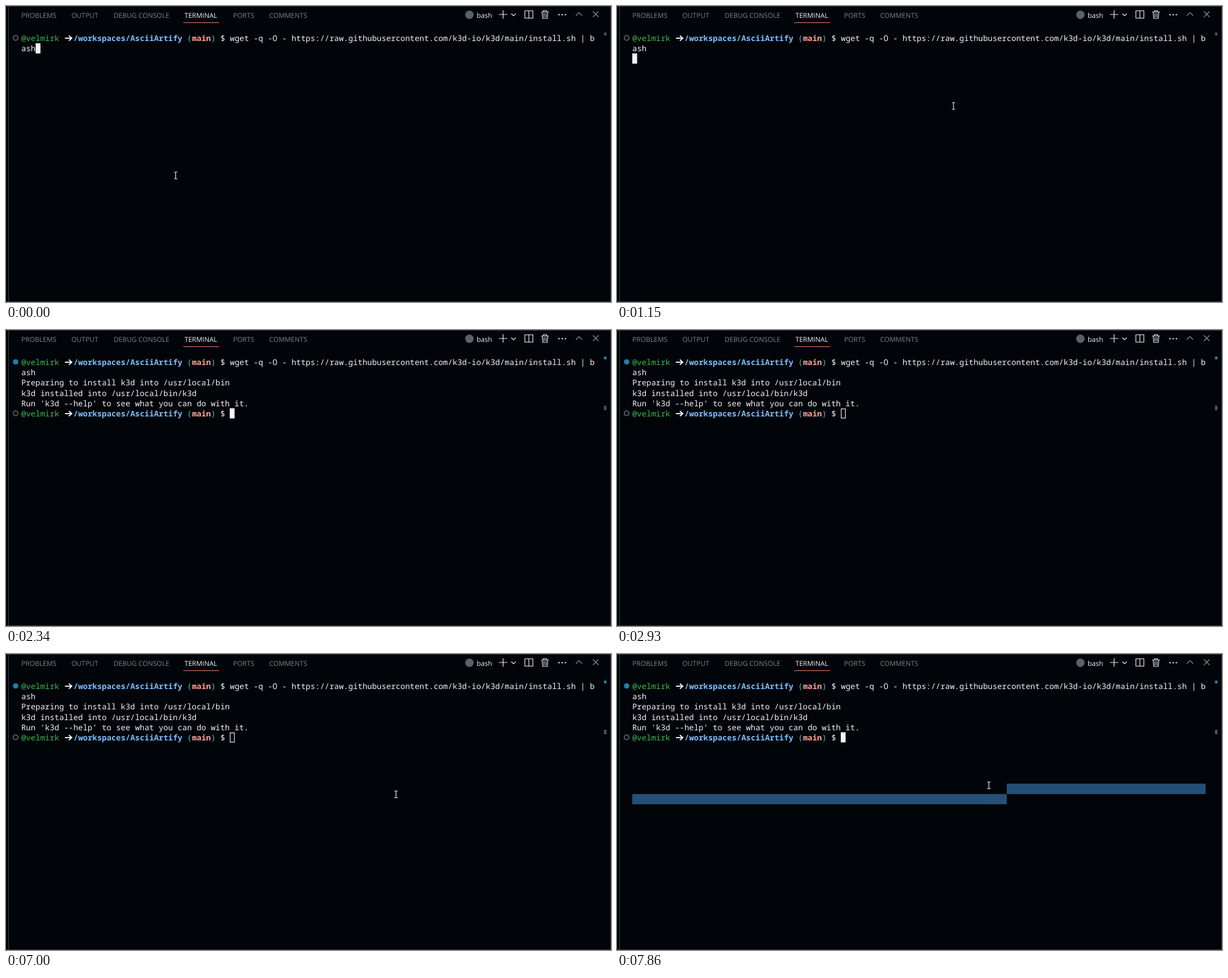
Animation, 1068 px wide and 524 px high, one loop 8 s. Source, as an HTML page:

```html
<!DOCTYPE html>
<html lang="en">
<head>
<meta charset="utf-8">
<title>Terminal</title>
<style>
  html, body { margin: 0; width: 100%; height: 100%; overflow: hidden; background: #010409; }
  svg { display: block; width: 1068px; height: 524px; }
  text { white-space: pre; text-rendering: geometricPrecision; }
  .ui { font: 12px "Open Sans", sans-serif; fill: #7d8590; }
  .ui .on { fill: #f0f6fc; }
  .term { font: 13.95px "Noto Sans Mono", monospace; fill: #f0f6fc; }
  .user { fill: #3fb950; }
  .path { fill: #79c0ff; font-weight: bold; }
  .paren { fill: #39c5cf; }
  .branch { fill: #ffa198; font-weight: bold; }
  .line { fill: none; stroke: #f0f6fc; stroke-width: 1.2; }
  .dim { stroke: #8b949e; }
  .ring { fill: none; stroke: #6e7681; stroke-width: 1.5; }
  .mark { fill: #484f58; }
  .done { fill: #1b81a8; }
  .block { fill: #f0f6fc; }
</style>
</head>
<body>
<svg viewBox="0 0 1068 524">
  <defs>
    <g id="prompt">
      <text class="user" x="27" y="62">@velmirk</text>
      <path d="M104 57H115M111 52.5L116 57L111 61.5" fill="none" stroke="#f0f6fc" stroke-width="2.1"/>
      <text x="119.1" y="62"><tspan class="path">/workspaces/AsciiArtify</tspan> <tspan class="paren">(</tspan><tspan class="branch">main</tspan><tspan class="paren">)</tspan> $ </text>
    </g>
  </defs>

  <path d="M0 .5H1068M4.5 0V524M1067.5 0V524M0 523.5H1068" stroke="#3d444d" fill="none"/>

  <g class="ui">
    <text x="27" y="20.5">PROBLEMS</text>
    <text x="115.5" y="20.5">OUTPUT</text>
    <text x="190" y="20.5">DEBUG CONSOLE</text>
    <text x="315" y="20.5" class="on">TERMINAL</text>
    <text x="401" y="20.5">PORTS</text>
    <text x="464.5" y="20.5">COMMENTS</text>
    <path d="M313 29.5H376" stroke="#f78166" stroke-width="1.2"/>
    <circle id="shellIcon" cx="818" cy="15.5" r="7.5" fill="#59616b"/>
    <text id="shellName" x="858" y="20.5" class="on" text-anchor="end">bash</text>
  </g>

  <g class="line">
    <path d="M870 15H885M877.5 7.5V22.5"/>
    <path d="M892 13.5L896 17.5L900 13.5"/>
    <path d="M916 8.5H930V21.5H916ZM923 8.5V21.5"/>
    <path d="M945 10.5H958M949 10V8H954V10M946.5 11L947.5 22H955.5L956.5 11M949.8 12.5V20M953.2 12.5V20"/>
    <path d="M975 15.3H977.2M980.7 15.3H982.9M986.4 15.3H988.6" stroke-width="2.2"/>
    <path class="dim" d="M1006 17L1011.5 11.5L1017 17M1036 9.5L1046 19.5M1046 9.5L1036 19.5"/>
  </g>

  <g class="term">
    <g data-from="7150" fill="#264f78">
      <path d="M688 229.5H1039V248H688V266H27V248H688Z"/>
    </g>
    <use href="#prompt"/>
    <text x="395.3" y="62">wget -q -O - https://raw.githubusercontent.com/k3d-io/k3d/main/install.sh | b</text>
    <text x="27" y="80.2">ash</text>
    <text x="27" y="98.4" data-from="1940">Preparing to install k3d into /usr/local/bin</text>
    <g data-from="2340">
      <text x="27" y="116.6">k3d installed into /usr/local/bin/k3d</text>
      <text x="27" y="134.8">Run 'k3d --help' to see what you can do with it.</text>
      <use href="#prompt" y="91"/>
    </g>
  </g>

  <g data-to="2340">
    <circle class="ring" cx="17" cy="56.5" r="4.2"/>
    <rect class="mark" x="1055.5" y="47" width="4.5" height="5"/>
  </g>
  <g data-from="2340">
    <circle class="done" cx="17" cy="56.5" r="4.8"/>
    <rect class="done" x="1055.5" y="47" width="4.5" height="5"/>
    <circle class="ring" cx="17" cy="147.5" r="4.2"/>
    <rect class="mark" x="1055.5" y="134" width="4.5" height="8"/>
  </g>

  <rect id="caret" class="block" width="8.5" height="18"/>
  <rect class="line" x="395.8" y="139.6" width="7.4" height="16.4" data-from="2930" data-to="7150"/>
  <path id="mouse" class="line" d="M-3 -6H-1L0 -5.3L1 -6H3M0 -5.3V5.3M-3 6H-1L0 5.3L1 6H3"/>
</svg>
<script>
const LOOP = 8000;
const byId = id => document.getElementById(id);
const timed = [...document.querySelectorAll("[data-from], [data-to]")];

// [time, x, y]; a step without a position hides the item
const caretSteps = [[0, 52.3, 66], [270, 27, 84], [1940, 27, 102], [2340, 395, 138.5], [2930], [7150, 395, 138.5]];
const mouseSteps = [
  [0, 299.5, 300], [730, 338.5, 271], [880, 475.5, 226.5], [1030, 545, 197], [1150, 594, 177],
  [1300, 995, 145.5], [1420, 1057, 151.5], [1570],
  [6330, 922.5, 231.5], [6450, 904.5, 232.5], [6600, 753.5, 250.5], [6750, 688.5, 250.5],
  [7000, 688.5, 248.5], [7430, 676.5, 239.5], [7580, 657.5, 234.5], [7860, 656.5, 232.5]
];

function show(el, visible) {
  el.style.display = visible ? "" : "none";
}

function place(el, steps, t) {
  const [, x, y] = steps.findLast(step => step[0] <= t);
  show(el, x !== undefined);
  if (x !== undefined) el.setAttribute("transform", `translate(${x} ${y})`);
}

function render(t) {
  for (const el of timed) {
    const { from = 0, to = LOOP } = el.dataset;
    show(el, t >= from && t < to);
  }
  place(byId("caret"), caretSteps, t);
  place(byId("mouse"), mouseSteps, t);

  const fetching = t >= 580 && t < 880;
  byId("shellName").textContent = fetching ? "curl" : "bash";
  byId("shellIcon").setAttribute("cx", fetching ? 824 : 818);
}

function tick() {
  render(performance.now() % LOOP);
  requestAnimationFrame(tick);
}
tick();
</script>
</body>
</html>
```
